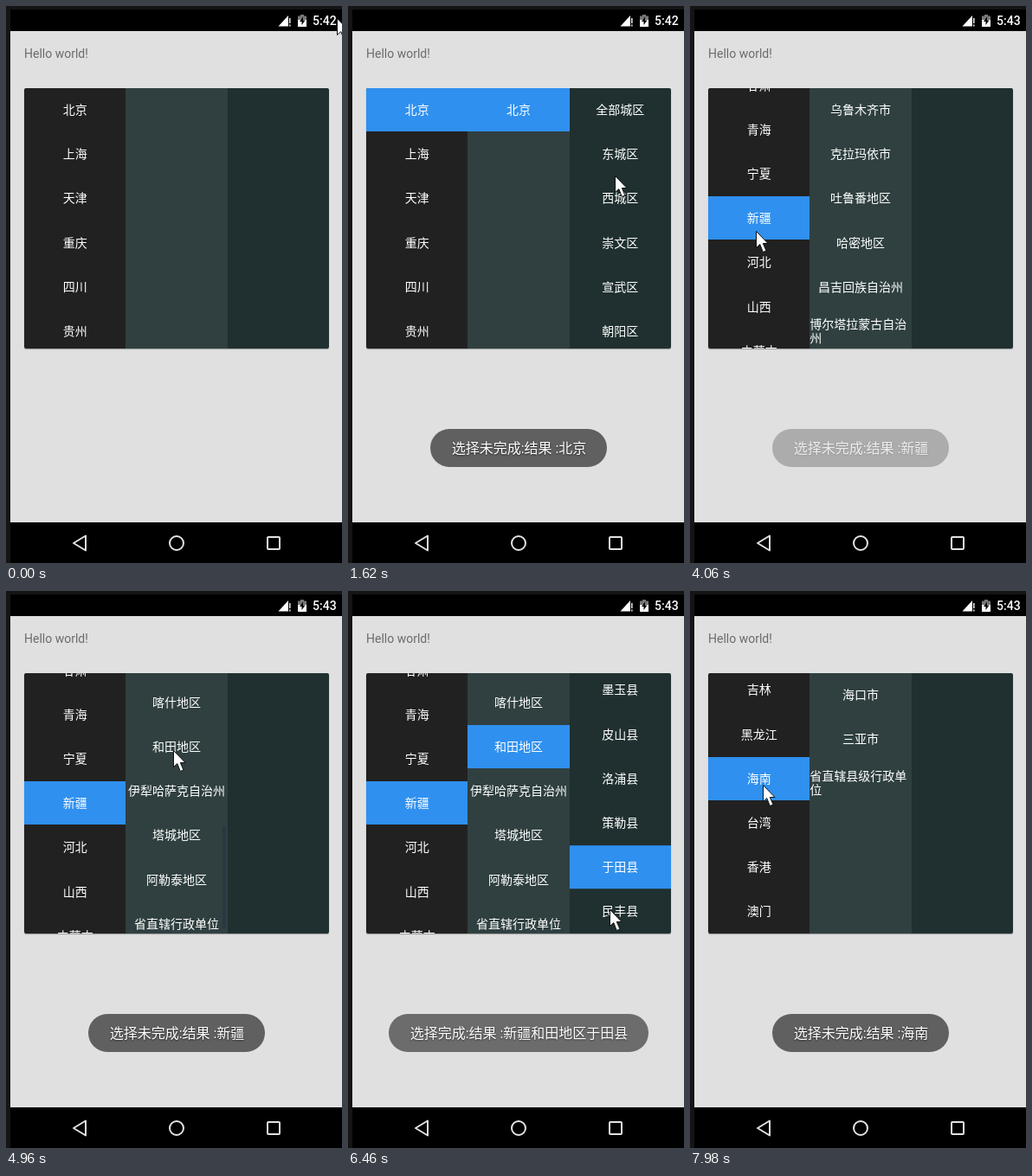
Animation of 388x644 px, one loop 8000 ms. Source, as an HTML page:

```html
<!DOCTYPE html>
<html lang="zh-CN">
<head>
<meta charset="utf-8">
<title>Region picker</title>
<style>
html, body { margin: 0; width: 100%; height: 100%; overflow: hidden; background: #151515; }
#stage { position: relative; width: 388px; height: 644px; overflow: hidden; font: 14px/16px Roboto, "Noto Sans CJK SC", "Noto Sans CJK", sans-serif; }
#stage > * { position: absolute; }
#screen { left: 5px; top: 4px; width: 383px; height: 640px; background: #000; }
#page { left: 5px; top: 29px; width: 383px; height: 568px; background: #e0e0e0; }
#hello { left: 21px; top: 47px; color: #6b6b6b; white-space: nowrap; }
#clock { left: 354px; top: 9px; color: #fff; font-weight: 500; white-space: nowrap; }
#card { left: 21px; top: 95px; width: 352px; height: 300.8px; display: flex; overflow: hidden; border-radius: 2px; box-shadow: 0 1px 1px #0005; }
.col { position: relative; flex: 1; overflow: hidden; color: #fff; }
.col:nth-child(1) { background: #212121; }
.col:nth-child(2) { background: #304040; }
.col:nth-child(3) { background: #203030; }
.rows { position: absolute; inset: 0 0 auto; }
.row { height: 50.13px; margin-bottom: 1.07px; display: flex; align-items: center; justify-content: center; }
.row.on { background: #2f90ef; }
.bar { position: absolute; right: 2px; width: 4px; background: #20304880; }
#toastBox { left: 5px; top: 489px; width: 384px; text-align: center; }
#toast { display: inline-block; height: 44px; padding: 0 24px 0 25px; border-radius: 22px; background: #606060; color: #fff; font-size: 16px; line-height: 45px; white-space: nowrap; text-shadow: 0 1px 2px #0009; }
svg { left: 0; top: 0; overflow: visible; }
</style>
</head>
<body>
<div id="stage">
  <div id="screen"></div>
  <div id="page"></div>
  <div id="hello">Hello world!</div>
  <div id="clock"></div>
  <svg width="388" height="644" fill="none">
    <path d="M314.5 23.5H326V11Z" fill="#fff"/>
    <path d="M327.8 14v6M327.8 21.5v2" stroke="#ddd" stroke-width="1.6"/>
    <path d="M337 11.5h3V10h4v1.5h3V16h-10Z" fill="#777"/>
    <path d="M337 16h10v8h-10Z" fill="#fff"/>
    <path d="M343 12.5l-4 5.5h2.5v4l4-5.5H343Z" fill="#000"/>
    <g stroke="#e2e2e2" stroke-width="2" stroke-linejoin="round">
      <path d="M92 612.5v17L78 621Z"/>
      <circle cx="197" cy="621" r="8"/>
      <rect x="302" y="614" width="14" height="14" rx="1"/>
    </g>
  </svg>
  <div id="card"></div>
  <div id="toastBox"><span id="toast"></span></div>
  <svg id="cursor" width="16" height="26">
    <path d="M.5 .5V19.5L4.8 15.6L8.3 24.5L12 23L8.3 14.5H14Z" fill="#fff" stroke="#111"/>
  </svg>
</div>
<script>
const LOOP = 8000, PITCH = 51.2, VIEW = 300.8;
const $ = id => document.getElementById(id);
const words = s => s.split(' ');

const provinces = words('北京 上海 天津 重庆 四川 贵州 云南 西藏 河南 湖北 湖南 广东 广西 陕西 甘肃 青海 宁夏 新疆 河北 山西 内蒙古 江苏 浙江 安徽 福建 江西 山东 辽宁 吉林 黑龙江 海南 台湾 香港 澳门');
const cities = {
  北京: ['北京'],
  新疆: words('乌鲁木齐市 克拉玛依市 吐鲁番地区 哈密地区 昌吉回族自治州 博尔塔拉蒙古自治州 巴音郭楞蒙古自治州 阿克苏地区 克孜勒苏柯尔克孜自治州 喀什地区 和田地区 伊犁哈萨克自治州 塔城地区 阿勒泰地区 省直辖行政单位'),
  海南: words('海口市 三亚市 省直辖县级行政单位')
};
const areas = {
  北京: words('全部城区 东城区 西城区 崇文区 宣武区 朝阳区'),
  和田地区: words('和田市 和田县 墨玉县 皮山县 洛浦县 策勒县 于田县 民丰县')
};
const none = [];

const picks = [
  { at: 0, names: [] },
  { at: 900, names: ['北京'] },
  { at: 1200, names: ['北京', '北京'] },
  { at: 2140, names: ['北京', '北京', '东城区'] },
  { at: 3980, names: ['新疆'] },
  { at: 5160, names: ['新疆', '和田地区'] },
  { at: 6280, names: ['新疆', '和田地区', '于田县'] },
  { at: 7780, names: ['海南'] }
];

// Each pick queues a toast; a waiting one cuts the current one short.
let free = 0;
const toasts = picks.slice(1).map(({ at, names }, i) => {
  const from = Math.max(at, free);
  const next = picks[i + 2] ? picks[i + 2].at : LOOP * 2;
  free = Math.min(from + 1120, next + 650);
  return { from, to: free, text: `选择${names.length < 3 ? '未' : ''}完成:结果 :${names.join('')}` };
});

const swipes = [
  { col: 0, at: 3240, ms: 520, by: 745 },
  { col: 1, at: 4460, ms: 400, by: 452 },
  { col: 2, at: 5560, ms: 300, by: 108 },
  { col: 0, at: 7060, ms: 500, by: 700 }
];

// Cursor stops: time, x, y
const stops = [
  [0, 382, 14], [500, 160, 295], [900, 75, 118], [1200, 190, 122], [1620, 308, 196],
  [2040, 314, 136], [2540, 310, 172], [3040, 187, 321], [3240, 76, 335], [3760, 76, 190],
  [4060, 76, 260], [4460, 190, 335], [4960, 193, 184], [5460, 298, 340], [5860, 303, 235],
  [6460, 302, 368], [7060, 82, 340], [7580, 84, 224]
];

// The screen refreshes every 100 ms, slipping 20 ms at these points.
const slips = [1520, 2440, 3760, 7480];
const tick = t => {
  const lag = 20 * slips.filter(s => t >= s).length;
  return Math.floor((t - lag) / 100) * 100 + lag;
};

const clamp = (v, max = 1) => Math.max(0, Math.min(max, v));
const ease = k => k * k * (3 - 2 * k);

function cursorAt(t) {
  const i = stops.findIndex(s => s[0] > t);
  if (i < 0) return stops[stops.length - 1].slice(1);
  const [t0, x0, y0] = stops[i - 1], [t1, x1, y1] = stops[i];
  const k = ease((t - t0) / (t1 - t0));
  return [x0 + (x1 - x0) * k, y0 + (y1 - y0) * k];
}

function make(cls, parent) {
  const el = document.createElement('div');
  el.className = cls;
  return parent.appendChild(el);
}

const cols = [0, 1, 2].map(() => {
  const box = make('col', $('card'));
  return { rows: make('rows', box), bar: make('bar', box), items: none };
});

function fill(col, items, chosen) {
  if (col.items !== items) {
    col.items = items;
    col.rows.textContent = '';
    for (const name of items) {
      make('row', col.rows).appendChild(document.createElement('span')).textContent = name;
    }
  }
  [...col.rows.children].forEach((row, i) => row.classList.toggle('on', items[i] === chosen));
}

function scroll({ rows, bar, items }, own, t) {
  const total = Math.max(VIEW, items.length * PITCH - 1);
  const moved = own.reduce((sum, s) => sum + s.by * ease(clamp((t - s.at) / s.ms)), 0);
  const y = clamp(moved, total - VIEW);
  rows.style.transform = `translateY(${-y}px)`;
  bar.style.top = VIEW * y / total + 'px';
  bar.style.height = VIEW * VIEW / total + 'px';
  bar.hidden = !own.some(s => t >= s.at && t < s.at + s.ms + 300);
}

function draw(t) {
  const { names } = picks.filter(p => p.at <= t).pop();
  const lists = [provinces, cities[names[0]] || none, areas[names[1]] || none];
  cols.forEach((col, i) => {
    fill(col, lists[i], names[i]);
    scroll(col, swipes.filter(s => s.col === i), t);
  });

  const note = toasts.find(n => t >= n.from && t < n.to);
  $('toast').style.opacity = note ? Math.min(clamp((t - note.from) / 200), clamp((note.to - t) / 120)) : 0;
  if (note) $('toast').textContent = note.text;

  $('clock').textContent = t < 3640 ? '5:42' : '5:43';
  const [x, y] = cursorAt(t).map(Math.round);
  $('cursor').style.transform = `translate(${x}px,${y}px)`;
}

const start = performance.now();
let last = -1;
function loop() {
  const t = tick((performance.now() - start) % LOOP);
  if (t !== last) draw(last = t);
  requestAnimationFrame(loop);
}
loop();
</script>
</body>
</html>
```
